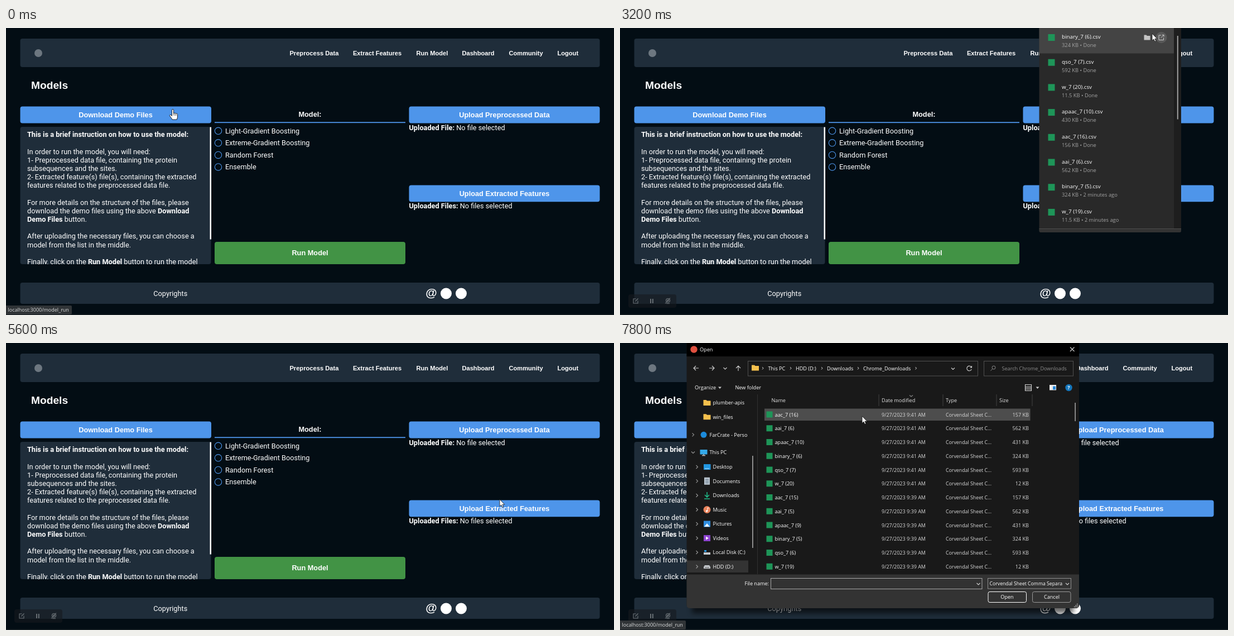
Recreate the animation shown at these times as an HTML page. Size 1090 by 514 pixels, loop 8000 ms.

```html
<!DOCTYPE html>
<html lang="en">
<head>
<meta charset="utf-8">
<title>Models</title>
<style>
html, body { margin: 0; width: 100%; height: 100%; overflow: hidden; background: #030d14; }
svg { display: block; width: 1090px; height: 514px; }
text { white-space: pre; }
.page { font: 12.72px Roboto, sans-serif; fill: #fff; }
.btn { font: bold 12.78px "Liberation Sans", Arial, sans-serif; text-anchor: middle; }
.nav { font: bold 11.15px "Liberation Sans", Arial, sans-serif; }
.b { font-weight: bold; }
.ui { font: 9.1px "Open Sans", "Noto Sans", sans-serif; fill: #fff; }
.line { fill: none; stroke: #d0d0d0; stroke-width: 1.1; }
.panel { fill: #1f2d3a; }
.blue { fill: #4e95ea; }

/* one step is 200 ms = 2.5% of the loop */
.anim { animation: 8s step-end infinite; }
#cursor { animation-name: cursor; }
#hand { animation-name: hand; }
#arrow { animation-name: arrow; }
#ring { animation-name: ring; }
#rise1 { animation-name: rise1; }
#rise2 { animation-name: rise2; }
#controls { animation-name: controls; }
#status { animation-name: status; }
#wide { animation-name: wide; }
#popup { animation-name: popup; }
#hover { animation-name: hover; }
#ghost { animation-name: ghost; }
#dialog { animation-name: dialog; }
#rowHover { animation-name: rowHover; }

@keyframes cursor {
  0% { transform: translate(299px, 146px); }
  2.5% { transform: translate(301px, 147px); }
  5% { transform: translate(303px, 148px); }
  7.5% { transform: translate(304px, 149px); }
  12.5% { transform: translate(305px, 150px); }
  20% { transform: translate(390px, 146px); }
  22.5% { transform: translate(560px, 136px); }
  25% { transform: translate(760px, 126px); }
  27.5% { transform: translate(890px, 120px); }
  30% { transform: translate(932px, 117px); }
  32.5% { transform: translate(945px, 60px); }
  35% { transform: translate(950px, 4px); }
  37.5% { transform: translate(952px, -20px); }
  40% { transform: translate(954px, 10px); }
  42.5% { transform: translate(953px, 30px); }
  45% { transform: translate(952.5px, 40.5px); }
  47.5% { transform: translate(930px, 75px); }
  50% { transform: translate(870px, 125px); }
  52.5% { transform: translate(775px, 200px); }
  55% { transform: translate(704px, 238px); }
  60% { transform: translate(702px, 240px); }
  62.5% { transform: translate(722px, 246px); }
  65% { transform: translate(790px, 262px); }
  67.5% { transform: translate(855px, 275px); }
  70% { transform: translate(885px, 280px); }
  75% { transform: translate(887px, 284px); }
  77.5% { transform: translate(888px, 287px); }
  90% { transform: translate(865px, 270px); }
  92.5% { transform: translate(760px, 205px); }
  95% { transform: translate(480px, 135px); }
  97.5%, 100% { transform: translate(434px, 131px); }
}
@keyframes hand { 0% { visibility: visible; } 20%, 100% { visibility: hidden; } }
@keyframes arrow { 0% { visibility: hidden; } 20%, 100% { visibility: visible; } }
@keyframes ring { 0% { visibility: hidden; } 25% { visibility: visible; } 35%, 100% { visibility: hidden; } }
@keyframes rise1 {
  0% { opacity: 0; transform: translate(995px, 217px); }
  2.5% { opacity: 1; transform: translate(995px, 217px); }
  5% { opacity: 1; transform: translate(995px, -9px); }
  7.5% { opacity: 0; transform: translate(995px, -30px); }
  22.5% { opacity: 1; transform: translate(995px, 217px); }
  25% { opacity: 1; transform: translate(995px, -9px); }
  27.5% { opacity: 1; transform: translate(995px, 217px); }
  30% { opacity: 1; transform: translate(995px, -9px); }
  32.5%, 100% { opacity: 0; transform: translate(995px, -30px); }
}
@keyframes rise2 {
  0% { opacity: 0; transform: translate(995px, 217px); }
  30% { opacity: 1; transform: translate(995px, 217px); }
  32.5% { opacity: 1; transform: translate(995px, -9px); }
  35%, 100% { opacity: 0; transform: translate(995px, -30px); }
}
@keyframes controls { 0% { visibility: hidden; } 5%, 100% { visibility: visible; } }
@keyframes status {
  0% { visibility: visible; } 35% { visibility: hidden; } 77.5%, 100% { visibility: visible; }
}
@keyframes wide { 0% { visibility: hidden; } 15% { visibility: visible; } 22.5%, 100% { visibility: hidden; } }
@keyframes popup { 0% { visibility: hidden; } 37.5% { visibility: visible; } 62.5%, 100% { visibility: hidden; } }
@keyframes hover {
  0% { opacity: 0; transform: none; }
  40% { opacity: 1; transform: none; }
  47.5% { opacity: 1; transform: translateY(44.7px); }
  50% { opacity: 1; transform: translateY(89.4px); }
  52.5% { opacity: 1; transform: translateY(178.8px); }
  55%, 100% { opacity: 0; transform: none; }
}
@keyframes ghost { 0% { opacity: 0; } 82.5% { opacity: .5; } 85%, 100% { opacity: 0; } }
@keyframes dialog { 0% { visibility: hidden; } 85%, 100% { visibility: visible; } }
@keyframes rowHover { 0% { opacity: 0; } 95%, 100% { opacity: 1; } }
</style>
</head>
<body>
<svg viewBox="0 0 1090 514">
  <defs>
    <filter id="blur"><feGaussianBlur stdDeviation="5"/></filter>
    <clipPath id="textClip"><rect x="25" y="177" width="340" height="246"/></clipPath>
    <clipPath id="sideClip"><rect x="120" y="90" width="111.5" height="324"/></clipPath>
    <g id="dl">
      <circle r="24.5" fill="#0d1820"/>
      <path d="M0-9V3M-5-2 0 3 5-2M-9 4V9H9V4" fill="none" stroke="#22313f" stroke-width="2.4"/>
    </g>
  </defs>

  <rect width="1090" height="514" fill="#030d14"/>
  <g class="page">
    <rect class="panel" x="25.5" y="19" width="1039" height="51" rx="4"/>
    <circle cx="58" cy="45" r="7" fill="#6d7780"/>
    <g id="nav" class="nav"></g>
    <text x="45" y="108.5" style="font: bold 19.2px 'Liberation Sans', Arial, sans-serif">Models</text>

    <rect class="panel" x="25.5" y="177" width="342" height="246" rx="4"/>
    <g id="guide" clip-path="url(#textClip)"></g>
    <rect x="365.5" y="177.5" width="2.5" height="201" fill="#fff"/>

    <rect class="blue" x="374" y="168.3" width="342" height="1.8"/>
    <g id="models"></g>

    <rect class="blue" x="25.5" y="140.5" width="342.5" height="30" rx="4"/>
    <rect class="blue" x="722.5" y="140.5" width="342" height="30" rx="4"/>
    <rect class="blue" x="722.5" y="281.5" width="342" height="29.7" rx="4"/>
    <rect x="374" y="383" width="342" height="40" rx="4" fill="#429345"/>
    <g class="btn">
      <text x="196.5" y="159.5">Download Demo Files</text>
      <text x="545" y="159">Model:</text>
      <text x="893.5" y="159.5">Upload Preprocessed Data</text>
      <text x="893.5" y="300.7">Upload Extracted Features</text>
      <text x="545" y="407">Run Model</text>
    </g>
    <text x="722.5" y="182.7"><tspan class="b">Uploaded File:</tspan> No file selected</text>
    <text x="722.5" y="323.3"><tspan class="b">Uploaded Files:</tspan> No files selected</text>

    <rect class="panel" x="25.5" y="456" width="1039" height="38" rx="4"/>
    <text x="264.3" y="480">Copyrights</text>
    <text x="762.5" y="481" style="font: bold 21px 'Liberation Sans', Arial, sans-serif" text-anchor="middle">@</text>
    <circle cx="789" cy="475.5" r="10"/>
    <circle cx="816" cy="475.5" r="10"/>
  </g>
  <rect y="512.7" width="1090" height="1.3" fill="#1a2126"/>

  <use id="rise1" class="anim" href="#dl"/>
  <use id="rise2" class="anim" href="#dl"/>

  <g id="ghost" class="anim">
    <rect x="145" y="18" width="643.5" height="435" rx="5" fill="#25262a"/>
    <path d="M145 40V23q0-5 5-5H783q5 0 5 5V40z" fill="#000"/>
    <circle cx="157" cy="29" r="5.8" fill="#e0503f"/>
    <text class="ui" x="166.5" y="32.3">Open</text>
    <path class="line" d="M774 25l7 7m0-7l-7 7"/>
    <path fill="#fff" d="M145 40h643.5v358H145zM240 406h40v11h-40zM283 404h347v17H283zM639 404h137v17H639zM639 425h64v19h-64zM712 425h64v19h-64zM776 440h12v9q0 4-4 4h-8z"/>
  </g>

  <g id="dialog" class="anim ui">
    <rect x="129" y="20" width="684" height="464" fill="#000" opacity=".6" filter="url(#blur)"/>
    <rect x="119.5" y="-8" width="703.5" height="483" rx="6" fill="#191919"/>
    <rect x="119.5" width="703.5" height="24" fill="#000"/>
    <circle cx="132.5" cy="11.5" r="6.2" fill="#e0503f"/>
    <text x="143" y="15.2">Open</text>
    <path class="line" d="M807 7.5l7.5 7.5m0-7.5l-7.5 7.5"/>

    <g class="line">
      <path d="M141 45h-9m4-4-4 4 4 4M160 45h9m-4-4 4 4-4 4M212 50v-9m-4 4 4-4 4 4"/>
      <path d="M185.5 44l3 3 3-3M594 44.5l3 3 3-3"/>
      <path d="M630 43.5a4.3 4.3 0 1 0 .2 3.5M630.5 41v3h-3"/>
    </g>
    <g fill="none" stroke="#505050">
      <rect x="229.5" y="32.5" width="412" height="26.5"/>
      <rect x="652.5" y="32.5" width="160" height="26.5"/>
    </g>
    <g id="path"></g>
    <circle cx="670" cy="44" r="3" fill="none" stroke="#888"/>
    <path d="M668 46.2l-3.5 3.5" stroke="#888"/>
    <text x="684.5" y="48.6" fill="#8d8d8d">Search Chrome_Downloads</text>

    <text x="134" y="83">Organize</text>
    <path d="M176 78.5h6l-3 3.5z" fill="#ccc"/>
    <text x="206.5" y="83">New folder</text>
    <path class="line" d="M726.5 74.5h11v11h-11zM726 78h12M726 80.5h12M726 83h12"/>
    <path d="M745.5 78.5h6l-3 3.5z" fill="#ccc"/>
    <rect x="770" y="75" width="12" height="9.5" fill="#eee"/>
    <rect x="776" y="77.5" width="5" height="6" fill="#2586d8"/>
    <circle cx="804.5" cy="80" r="6.2" fill="#1577bd"/>
    <text x="804.5" y="83.4" text-anchor="middle" class="b">?</text>

    <path d="M246.5 92V414" stroke="#303030"/>
    <path d="M464 92v21M579 92v21M675 92v21M739 92v21" stroke="#424242"/>
    <path class="line" d="M519 93.5l3 2.5 3-2.5" style="stroke: #888"/>
    <g fill="#e0e0e0">
      <text x="271.5" y="106.3">Name</text><text x="469" y="106.3">Date modified</text>
      <text x="584" y="106.3">Type</text><text x="680" y="106.3">Size</text>
    </g>
    <rect id="rowHover" class="anim" x="259" y="117.5" width="476.5" height="21.5" fill="#4d4d4d"/>
    <g id="files"></g>
    <rect x="815.3" y="107" width="1.7" height="33" fill="#9a9a9a"/>
    <rect x="237" y="202" width="1.8" height="165" fill="#9a9a9a"/>
    <rect x="120" y="389.5" width="110" height="21.5" fill="#333"/>
    <g id="side" clip-path="url(#sideClip)"></g>

    <path d="M119.5 414.5H823V469q0 6-6 6H125.5q-6 0-6-6z" fill="#333"/>
    <text x="267" y="434.3" text-anchor="end">File name:</text>
    <rect x="270.5" y="421.5" width="378.5" height="19" fill="#323232" stroke="#a8a8a8"/>
    <path class="line" d="M639.5 430l3 3 3-3M799 430l3 3 3-3"/>
    <rect x="659.5" y="421.5" width="149" height="18.5" fill="none" stroke="#8f8f8f"/>
    <text x="662.5" y="434.3" style="font-size: 8.7px">Corvendal Sheet Comma Separa</text>
    <rect x="660" y="445.5" width="68.5" height="19" rx="3" fill="#333" stroke="#fff"/>
    <rect x="739.5" y="445.5" width="68.5" height="19" rx="3" fill="#333" stroke="#9a9a9a"/>
    <text x="694" y="458.3" text-anchor="middle">Open</text>
    <text x="774" y="458.3" text-anchor="middle">Cancel</text>
    <path d="M814 472.5h7M816.5 470h4.5M819 467.5h2" stroke="#bbb" stroke-width="1.5" stroke-dasharray="1.5 1"/>
  </g>

  <g id="controls" class="anim">
    <rect x="15" y="477" width="86" height="24" rx="4" fill="#161a1e" opacity=".6"/>
    <g fill="none" stroke="#70777c" stroke-width="1.1">
      <path d="M28.5 485H24v8h8v-4.5M27.5 489.5l5-5"/>
      <path d="M55 485v8M58.8 485v8" stroke-width="1.8"/>
      <circle cx="86" cy="488" r="3.5"/>
      <circle cx="86" cy="488" r="1.3"/>
      <path d="M81 493.5l9-10M83 493.5h6"/>
    </g>
  </g>

  <g id="status" class="anim">
    <rect id="wide" class="anim" y="497" width="361.5" height="16" fill="#1d252a"/>
    <rect x="-3" y="497" width="121" height="16" rx="2" fill="#303437"/>
    <text class="ui" x="3.5" y="508.3" style="font-size: 9px; fill: #d9dbdc">localhost:3000/model_run</text>
  </g>

  <g id="popup" class="anim ui">
    <rect x="751.5" y="-8" width="254.5" height="374" rx="3" fill="#292929"/>
    <path d="M751.5 359.5H1006V363q0 3-3 3H754.5q-3 0-3-3z" fill="#333"/>
    <rect x="993" width="13" height="359" fill="#1e1e1e"/>
    <path d="M751.5 359.5H1006" stroke="#4c4c4c"/>
    <rect x="998.8" y="14" width="2" height="149.5" fill="#a0a0a0"/>
    <g id="hover" class="anim">
      <rect x="751.5" y="0" width="241.5" height="45.5" fill="#444"/>
      <path d="M939.5 12.5h4l1.5 1.5h5.5v7.5h-11z" fill="#c4c4c4"/>
      <circle cx="970.5" cy="17" r="10" fill="#5a5a5a"/>
      <path d="M970 13h-4v8.5h8.5v-4M972 12.5h3v3M975 12.5l-5 5" fill="none" stroke="#ccc"/>
    </g>
    <g id="downloads"></g>
  </g>

  <g id="cursor" class="anim">
    <g id="hand" class="anim">
      <path d="M-1.5 1.5q0-2 1.5-2t1.5 2V7q1-1.2 2.3 0 1.2-1 2.3.3 2-.8 2.4 1.2v4.5q0 2-1.3 5H-1q-1-2.5-4-6-1.5-2 0-2.5 1.5-.4 3.5 2z" fill="#fff" stroke="#111" stroke-width=".9"/>
      <path d="M1.5 7v3.5M3.8 7.5V11M6.1 8v3" stroke="#222" stroke-width=".7"/>
    </g>
    <g id="arrow" class="anim">
      <path d="M0 0V12.5L2.9 9.9 4.8 14.3 6.9 13.4 5 9.2H8.9z" fill="#fff" stroke="#111" stroke-width=".8"/>
    </g>
    <circle id="ring" class="anim" cx="11" cy="-.5" r="4.7" fill="none" stroke="#1c8fe6" stroke-width="3"/>
  </g>
</svg>
<script>
const fill = (id, parts) => { document.getElementById(id).innerHTML = parts.join(""); };
const text = (x, y, s, attrs = "") => `<text x="${x}" y="${y}" ${attrs}>${s}</text>`;
const square = (x, y, size) => `<rect x="${x}" y="${y}" width="${size}" height="${size}" fill="#1e9558"/>`;
const chevron = (x, y, open) => `<path class="line" style="stroke:#999" transform="translate(${x} ${y})" d="${
  open ? "M-3-1.5 0 1.5 3-1.5" : "M-1.5-3 1.5 0-1.5 3"}"/>`;
const folder = (x, y) => `<path transform="translate(${x} ${y})" d="M-6.5-5h5l1.5 1.5h6.5v8.5h-13z" fill="#f5c04d"/>`;

fill("nav", [[508, "Preprocess Data"], [621.5, "Extract Features"], [735, "Run Model"],
  [817, "Dashboard"], [901, "Community"], [988, "Logout"]].map(([x, s]) => text(x + .4, 48.5, s)));

const bold = s => `<tspan class="b">${s}</tspan>`;
fill("guide", [
  bold("This is a brief instruction on how to use the model:"), "",
  "In order to run the model, you will need:",
  "1- Preprocessed data file, containing the protein",
  "subsequences and the sites.",
  "2- Extracted feature(s) file(s), containing the extracted",
  "features related to the preprocessed data file.", "",
  "For more details on the structure of the files, please",
  `download the demo files using the above ${bold("Download")}`,
  `${bold("Demo Files")} button.`, "",
  "After uploading the necessary files, you can choose a",
  "model from the list in the middle.", "",
  `Finally, click on the ${bold("Run Model")} button to run the model`
].map((s, i) => text(38, 195.3 + i * 15.17, s)));

fill("models", ["Light-Gradient Boosting", "Extreme-Gradient Boosting", "Random Forest", "Ensemble"]
  .map((s, i) => {
    const y = 184.3 + i * 21.55;
    return `<circle cx="380.5" cy="${y}" r="6.2" fill="none" stroke="#4e95ea" stroke-width="1.1"/>` + text(393, y + 4.3, s);
  }));

fill("downloads", [["binary_7 (6)", "324 KB • Done"], ["qso_7 (7)", "592 KB • Done"],
  ["w_7 (20)", "11.5 KB • Done"], ["apaac_7 (10)", "430 KB • Done"], ["aac_7 (16)", "156 KB • Done"],
  ["aai_7 (6)", "562 KB • Done"], ["binary_7 (5)", "324 KB • 2 minutes ago"], ["w_7 (19)", "11.5 KB • 2 minutes ago"]]
  .map(([name, info], i) => {
    const y = i * 44.7;
    return square(767.5, y + 11, 12) + text(792, y + 19.2, name + ".csv", 'style="font-size:9.8px"')
      + text(792, y + 34.2, info, 'style="font-size:9.3px" fill="#a3a3a3"');
  }));

fill("path", [folder(242.5, 44.5), ...[[256, ""], [306, "This PC", 265.5], [362, "HDD (D:)", 315],
  [427, "Downloads", 371], [530.5, "Chrome_Downloads", 436]]
  .map(([x, s, at]) => `<path d="M${x - 1} 43l2 2.2-2 2.2" fill="none" stroke="#ddd"/>` + (s ? text(at, 48.5, s) : ""))]);

// two batches of the same six files
const kinds = [["aac", 16, 157], ["aai", 6, 562], ["apaac", 10, 431], ["binary", 6, 324], ["qso", 7, 593], ["w", 20, 12]];
fill("files", Array.from({ length: 12 }, (_, i) => {
  const [name, n, kb] = kinds[i % 6], old = i > 5, y = 131.7 + i * 24.75;
  return square(262.5, y - 9.2, 11) + text(277.5, y, `${name}_7 (${n - old})`)
    + `<g fill="#d8d8d8">${text(469, y, `9/27/2023 9:${old ? 39 : 41} AM`, 'style="font-size:9px"')}`
    + text(584, y, "Corvendal Sheet C...", 'style="font-size:8.8px"')
    + text(733, y, kb + " KB", 'text-anchor="end"') + "</g>";
}));

const icon = {
  folder: folder(0, 0),
  cloud: '<circle r="5.5" fill="#1c8bdc"/>',
  pc: '<path d="M-6.5-5h13v8.5h-13z" fill="#35a9e8"/><path d="M-3 5.5h6M0 3v2" stroke="#bbb" stroke-width="1.5"/>',
  desktop: '<path d="M-6-5H6.5V5H-6z" fill="#2196e0"/><path d="M-4 3h8" stroke="#bfe6ff"/>',
  doc: '<path d="M-5-6.5H5v13H-5z" fill="#b9c4ce"/><path d="M-3-3h6M-3 0h6M-3 3h6" stroke="#546a7c"/>',
  down: '<path d="M0-6V3M-4-1 0 3 4-1M-5 6H5" fill="none" stroke="#1fb886" stroke-width="1.6"/>',
  music: '<circle r="6.5" fill="#e9835c"/><path d="M1-3.5v6M1-3.5l2.5 1" stroke="#fff" fill="none"/><circle cx="-.5" cy="2.5" r="1.7" fill="#fff"/>',
  image: '<path d="M-6-5.5H6v11H-6z" fill="#2e8de0"/><path d="M-5 5 0-1 5 5z" fill="#e4f3ff"/>',
  video: '<path d="M-6-5.5H6v11H-6z" fill="#8d43cf"/><path d="M-2-3 3 0-2 3z" fill="#fff"/>',
  disk: '<path d="M-6 0h12v4H-6z" fill="#c4c8cc"/><path d="M-5-4h4v3h-4z" fill="#2a9be5"/>',
  drive: '<path d="M-4-2.5h8l2 3v3H-6v-3z" fill="#c4c8cc"/><path d="M-4 1.5h8" stroke="#555"/>'
};
fill("side", [
  [107, "folder", "plumber-apis"], [132.3, "folder", "win_files"], [164.3, "cloud", "FarCrate - Perso"],
  [196, "pc", "This PC"], [222, "desktop", "Desktop"], [247.3, "doc", "Documents"], [273, "down", "Downloads"],
  [298.5, "music", "Music"], [324, "image", "Pictures"], [349.5, "video", "Videos"],
  [375, "disk", "Local Disk (C:)"], [400.5, "drive", "HDD (D:)"]
].map(([y, kind, s], i) => {
  const top = i === 2 || i === 3;
  return (i > 1 ? chevron(top ? 131 : 138, y, i === 3) : "")
    + `<g transform="translate(${top ? 150 : 156} ${y})">${icon[kind]}</g>` + text(top ? 160.5 : 166.5, y + 3.3, s);
}));
</script>
</body>
</html>
```
